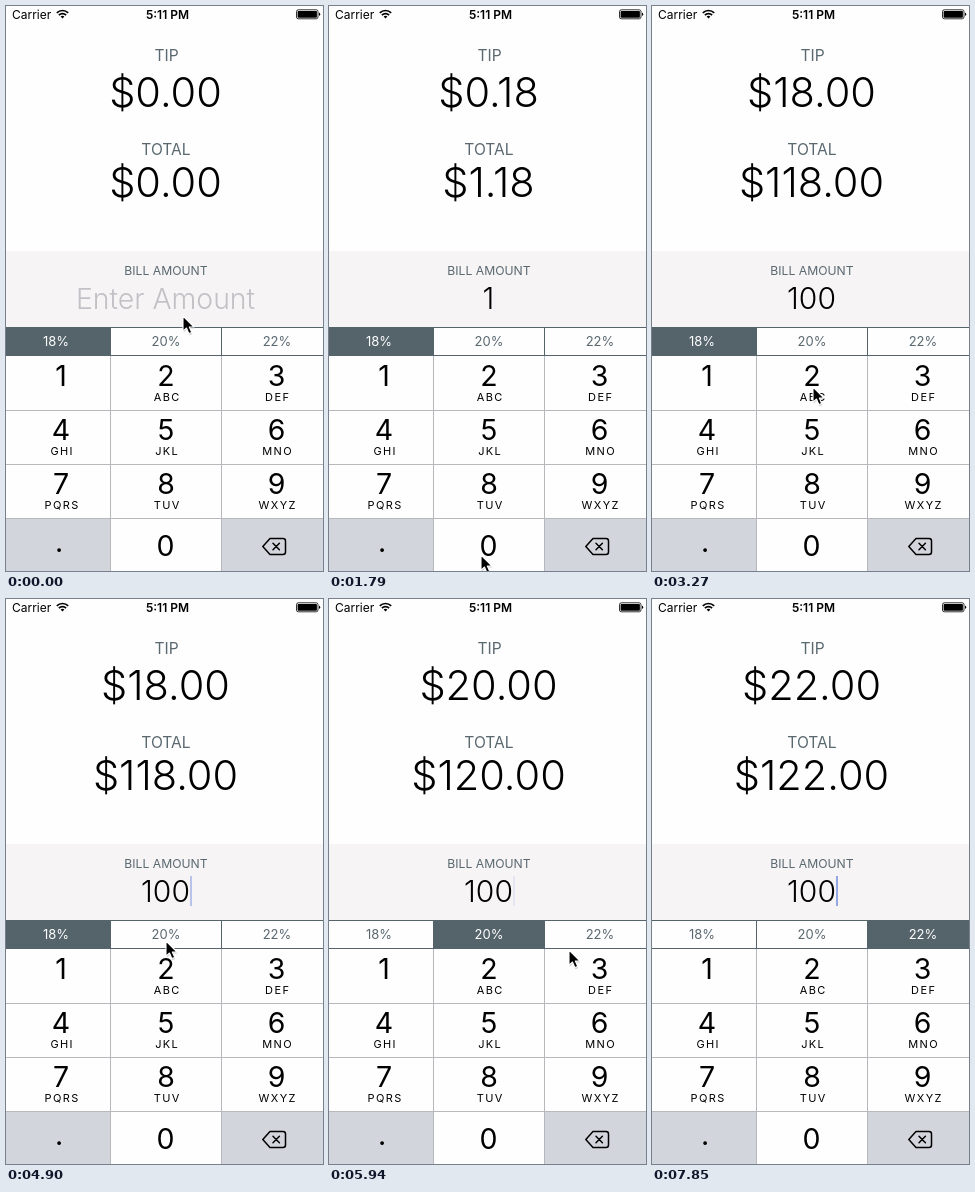
These frames come from a looping animation (317x565 px, 8 s). An HTML page:

```html
<!DOCTYPE html>
<html lang="en">
<head>
<meta charset="utf-8">
<title>Tip calculator</title>
<style>
  html, body { margin: 0; width: 100%; height: 100%; overflow: hidden; background: #fefefe; }
  svg { display: block; width: 317px; height: 565px; font-family: Inter, Roboto, sans-serif; }
  text { text-anchor: middle; fill: #000; }
  .label { fill: #5a6870; }
  .amount { font-size: 41.5px; font-weight: 300; }
  .seg { font-size: 13px; }
  .digit { font-size: 28.5px; }
  .letters { font-size: 11px; letter-spacing: 1.4px; }
</style>
</head>
<body>
<svg id="stage" viewBox="0 0 317 565" xmlns="http://www.w3.org/2000/svg">
  <rect width="317" height="565" fill="#fefefe"/>

  <g id="status">
    <text x="6" y="13" font-size="12" style="text-anchor:start">Carrier</text>
    <g fill="none" stroke="#000" stroke-width="1.7">
      <path d="M50.8 6.9a8 8 0 0 1 11.4 0M52.9 9.1a5 5 0 0 1 7.2 0"/>
    </g>
    <path d="M54.6 10.6a2.8 2.8 0 0 1 3.8 0L56.5 12.6Z"/>
    <text x="161.5" y="13" font-size="12" font-weight="600">5:11 PM</text>
    <rect x="290.5" y="3.8" width="21.5" height="9" rx="1.8" fill="none" stroke="#000" stroke-width=".8"/>
    <rect x="291.6" y="4.9" width="19.3" height="6.8" rx=".8"/>
    <path d="M313 6.6a1.8 1.8 0 0 1 0 3.4Z"/>
  </g>

  <text class="label" x="160.5" y="55" font-size="15.6">TIP</text>
  <text class="amount" id="tip" x="159.5" y="101"/>
  <text class="label" x="160" y="149" font-size="15.6">TOTAL</text>
  <text class="amount" id="total" x="159.5" y="191"/>

  <rect y="245" width="317" height="76" fill="#f6f4f5"/>
  <text class="label" x="160" y="269" font-size="12.2">BILL AMOUNT</text>
  <text id="bill" x="159.5" y="303" font-weight="300"/>
  <rect id="caret" y="277" width="2" height="30" fill="#4569d6"/>

  <g id="segments"></g>
  <g id="keys"></g>

  <g fill="none" stroke="#000" stroke-width="1.5" stroke-linejoin="round" stroke-linecap="round">
    <path d="M264 532.5H277a2.5 2.5 0 0 1 2.5 2.5V546a2.5 2.5 0 0 1 -2.5 2.5H264L256.8 540.5Z"/>
    <path d="M267 537.3l6.4 6.4m0-6.4l-6.4 6.4"/>
  </g>

  <g id="cursor">
    <path d="M0 0V15.2L3.5 12L5.9 17.6L8.7 16.4L6.3 11H11Z" fill="#000" opacity=".18" transform="translate(.6 1.6)"/>
    <path d="M0 0V15.2L3.5 12L5.9 17.6L8.7 16.4L6.3 11H11Z" stroke="#fff" stroke-width="1.1" stroke-linejoin="round"/>
  </g>
</svg>
<script>
const LOOP = 8000, STEP = 148.5;
const SLATE = '#55646b', WHITE = '#fefefe', GREY = '#d2d5db', LINE = '#b6b8bc';
const COLS = [0, 105, 216, 317];
const ROWS = [350, 405, 459, 513, 565];
const $ = id => document.getElementById(id);

function add(parent, tag, attrs, text = '') {
  const node = document.createElementNS('http://www.w3.org/2000/svg', tag);
  for (const name in attrs) node.setAttribute(name, attrs[name]);
  node.textContent = text;
  return parent.appendChild(node);
}

// Segmented control
const segments = [18, 20, 22].map((rate, i) => {
  const x = COLS[i];
  const box = add($('segments'), 'rect', { x, y: 322, width: COLS[i + 1] - x, height: 27 });
  const label = add($('segments'), 'text', { class: 'seg', x: [50, 160, 271][i], y: 340 }, rate + '%');
  return { rate, box, label };
});
for (const y of [321, 349]) add($('segments'), 'rect', { y, width: 317, height: 1, fill: SLATE });
for (const x of [104, 215]) add($('segments'), 'rect', { x, y: 321, width: 1, height: 29, fill: SLATE });

// Keypad
const keyBoxes = {};
const letters = ['', 'ABC', 'DEF', 'GHI', 'JKL', 'MNO', 'PQRS', 'TUV', 'WXYZ'];
['1', '2', '3', '4', '5', '6', '7', '8', '9', '.', '0', ''].forEach((key, i) => {
  const col = i % 3, row = Math.floor(i / 3);
  const x = COLS[col], y = ROWS[row];
  const center = [55, 160, 270.5][col];
  keyBoxes[key] = add($('keys'), 'rect', {
    x, y, width: COLS[col + 1] - x, height: ROWS[row + 1] - y,
    fill: key === '.' || key === '' ? GREY : WHITE
  });
  const base = row < 3 ? 380 + 54 * row : key === '.' ? 546 : 549.5;
  add($('keys'), 'text', { class: 'digit', x: key === '.' ? 53 : center - (row === 3 ? .5 : 0), y: base }, key);
  if (letters[i]) add($('keys'), 'text', { class: 'letters', x: center + 1.2, y: 395 + 54 * row }, letters[i]);
});
for (const y of [404, 458, 512]) add($('keys'), 'rect', { y, width: 317, height: 1, fill: LINE });
for (const x of [104, 215]) add($('keys'), 'rect', { x, y: 350, width: 1, height: 215, fill: LINE });

// Timelines: [time, value...]
const typed = [[0, ''], [880, '1'], [2070, '10'], [2370, '100']];
const rates = [[0, 18], [5480, 20], [6520, 22]];
const keyDown = [[0, null], [730, '1'], [880, null], [1920, '0'], [2070, null], [2220, '0'], [2370, null]];
const segDown = [[0, null], [5340, 20], [5480, null], [6370, 22], [6520, null]];
const path = [
  [0, 177, 310], [600, 58, 372], [890, 58, 374], [1340, 150, 540], [1640, 152, 549],
  [2530, 152, 549], [3270, 161, 381], [3860, 161, 350], [4450, 160, 342], [5500, 160, 342],
  [5940, 240, 351], [6240, 264, 347], [7560, 264, 345], [7710, 264, 546], [LOOP, 264, 580]
];

const clamp = v => Math.min(1, Math.max(0, v));
const current = (list, t) => list.filter(e => e[0] <= t).pop();

function cursorAt(t) {
  const i = Math.max(1, path.findIndex(p => p[0] > t));
  const [a, b] = [path[i - 1], path[i]];
  const u = clamp((t - a[0]) / (b[0] - a[0]));
  const s = u * u * (3 - 2 * u);
  return [a[1] + (b[1] - a[1]) * s, a[2] + (b[2] - a[2]) * s];
}

// Solid, quick fade out, dark, quick fade in; restarts at each typed digit
function caretAlpha(age) {
  const p = age % 1000;
  return p < 700 ? 1 - clamp((p - 430) / 155) : clamp((p - 900) / 100);
}

function draw(t) {
  const [since, bill] = current(typed, t);
  const rate = current(rates, t)[1];
  const tip = bill * rate / 100;
  $('tip').textContent = '$' + tip.toFixed(2);
  $('total').textContent = '$' + (+bill + tip).toFixed(2);

  $('bill').textContent = bill || 'Enter Amount';
  $('bill').setAttribute('font-size', bill ? 30 : 28.4);
  $('bill').setAttribute('fill', bill ? '#000' : '#c2c1c5');
  $('bill').style.fill = bill ? '#000' : '#c2c1c5';
  $('caret').setAttribute('x', 155.5 + 9.5 * bill.length);
  $('caret').setAttribute('opacity', bill ? caretAlpha(t - since) : 0);

  const touched = current(segDown, t)[1];
  for (const s of segments) {
    const on = s.rate === rate;
    s.box.setAttribute('fill', on ? SLATE : s.rate === touched ? '#dde0e1' : WHITE);
    s.label.style.fill = on ? '#fff' : '#5a6870';
  }

  const down = current(keyDown, t)[1];
  for (const key of ['0', '1']) keyBoxes[key].setAttribute('fill', key === down ? GREY : WHITE);

  const [x, y] = cursorAt(t);
  $('cursor').setAttribute('transform', `translate(${x} ${y})`);
  $('cursor').setAttribute('visibility', t > 7800 ? 'hidden' : 'visible');
}

const start = performance.now();
function tick() {
  const t = (performance.now() - start) % LOOP;
  draw(Math.floor((t + 4) / 148.15) * STEP);
  requestAnimationFrame(tick);
}
tick();
</script>
</body>
</html>
```
